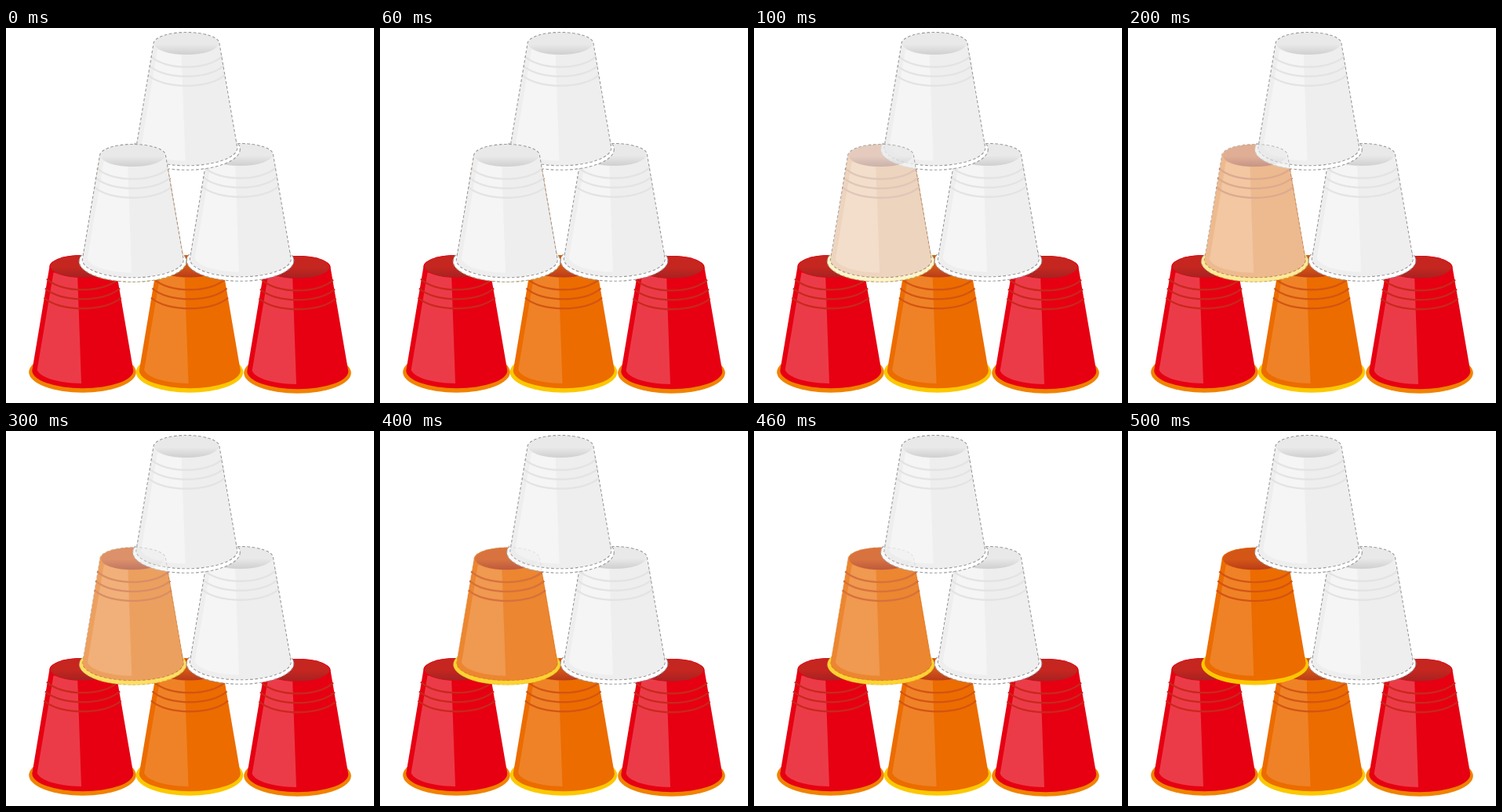
Animation of 469x479 px, one loop 0.6 s. Source, as an HTML page with a canvas:

```html
<!DOCTYPE html>
<html lang="en">
<head>
<meta charset="utf-8">
<title>Cup pyramid</title>
<style>
  html, body { margin: 0; width: 100%; height: 100%; overflow: hidden; background: #fff; }
  canvas { display: block; }
</style>
</head>
<body>
<canvas id="stage" width="469" height="479"></canvas>
<script>
const W = 469, H = 479, STEP = 100, STEPS = 6;
const red = { rim: '#f08300', body: '#e60012', shine: '#ec3b48', ring: '#c9281c', top: '#c5261f', low: '#a62222' };
const orange = { rim: '#fcc800', body: '#ec6c00', shine: '#ef8226', ring: '#d35413', top: '#d45616', low: '#b83c1a' };
const ghost = { rim: '#ffffff', body: '#eeeeee', shine: '#f5f5f5', ring: '#e3e3e3', top: '#e9e9e9', low: '#cfcfcf', dash: '#999999' };

function layer() {
  const c = document.createElement('canvas');
  c.width = W;
  c.height = H;
  return c;
}

function rimPath() {
  const p = new Path2D();
  p.ellipse(0, 135, 68.3, 26.3, 0, 0, Math.PI * 2);
  return p;
}

function bodyPath() {
  const p = new Path2D();
  p.ellipse(0, 0, 42, 14.5, 0, Math.PI, Math.PI * 2);
  p.lineTo(64.8, 133);
  p.ellipse(0.3, 133, 64.5, 22.8, 0, 0, Math.PI);
  p.closePath();
  return p;
}

const rim = rimPath(), body = bodyPath();
const shine = new Path2D('M-37 8 L-57.8 132 C-55 141 -34 149 -1.5 149.5 L-6.5 8 Z');
const rings = [[45.5, 16], [47.5, 28], [49, 40]];

// x, y is the centre of the small upper ellipse
function cup(g, x, y, c) {
  g.save();
  g.translate(x, y);
  g.fillStyle = c.rim;
  g.fill(rim);
  g.fillStyle = c.body;
  g.fill(body);
  g.fillStyle = c.shine;
  g.fill(shine);

  g.beginPath();
  g.ellipse(0, 0, 42, 14.5, 0, 0, Math.PI * 2);
  g.fillStyle = c.body;
  g.fill();
  const shade = g.createLinearGradient(0, -10, 0, 14);
  shade.addColorStop(0, c.top);
  shade.addColorStop(0.45, c.top);
  shade.addColorStop(1, c.low);
  g.beginPath();
  g.ellipse(0, 0, 40.8, 14, 0, 0, Math.PI * 2);
  g.fillStyle = shade;
  g.fill();

  g.strokeStyle = c.ring;
  g.lineWidth = 2.4;
  for (const [w, top] of rings) {
    g.beginPath();
    g.moveTo(-w, top);
    g.bezierCurveTo(-w * 0.6, top + 18.4, w * 0.6, top + 18.4, w, top);
    g.stroke();
  }

  if (c.dash) outline(g, c.dash);
  g.restore();
}

function outline(g, color) {
  g.strokeStyle = color;
  g.lineWidth = 1.1;
  g.setLineDash([3.6, 2.6]);
  g.stroke(body);
  // Only the part of the rim outside the body is visible
  const outside = new Path2D();
  outside.rect(-90, -40, 180, 230);
  outside.addPath(body);
  g.clip(outside, 'evenodd');
  g.stroke(rim);
}

const base = layer(), veil = layer();
const b = base.getContext('2d');
b.fillStyle = '#fff';
b.fillRect(0, 0, W, H);
cup(b, 97.5, 304.5, red);
cup(b, 371.5, 305.5, red);
cup(b, 234, 304.5, orange);
cup(b, 161.8, 163.3, orange);
cup(b, 298.5, 162, ghost);
cup(b, 230, 20, ghost);
cup(veil.getContext('2d'), 161.5, 163, ghost);

const g = document.getElementById('stage').getContext('2d');
const start = performance.now();

function draw(now) {
  const step = Math.floor(Math.max(0, now - start) / STEP) % STEPS;
  g.globalAlpha = 1;
  g.drawImage(base, 0, 0);
  g.globalAlpha = 1 - step / (STEPS - 1);
  g.drawImage(veil, 0, 0);
  requestAnimationFrame(draw);
}
draw(start);
</script>
</body>
</html>
```
